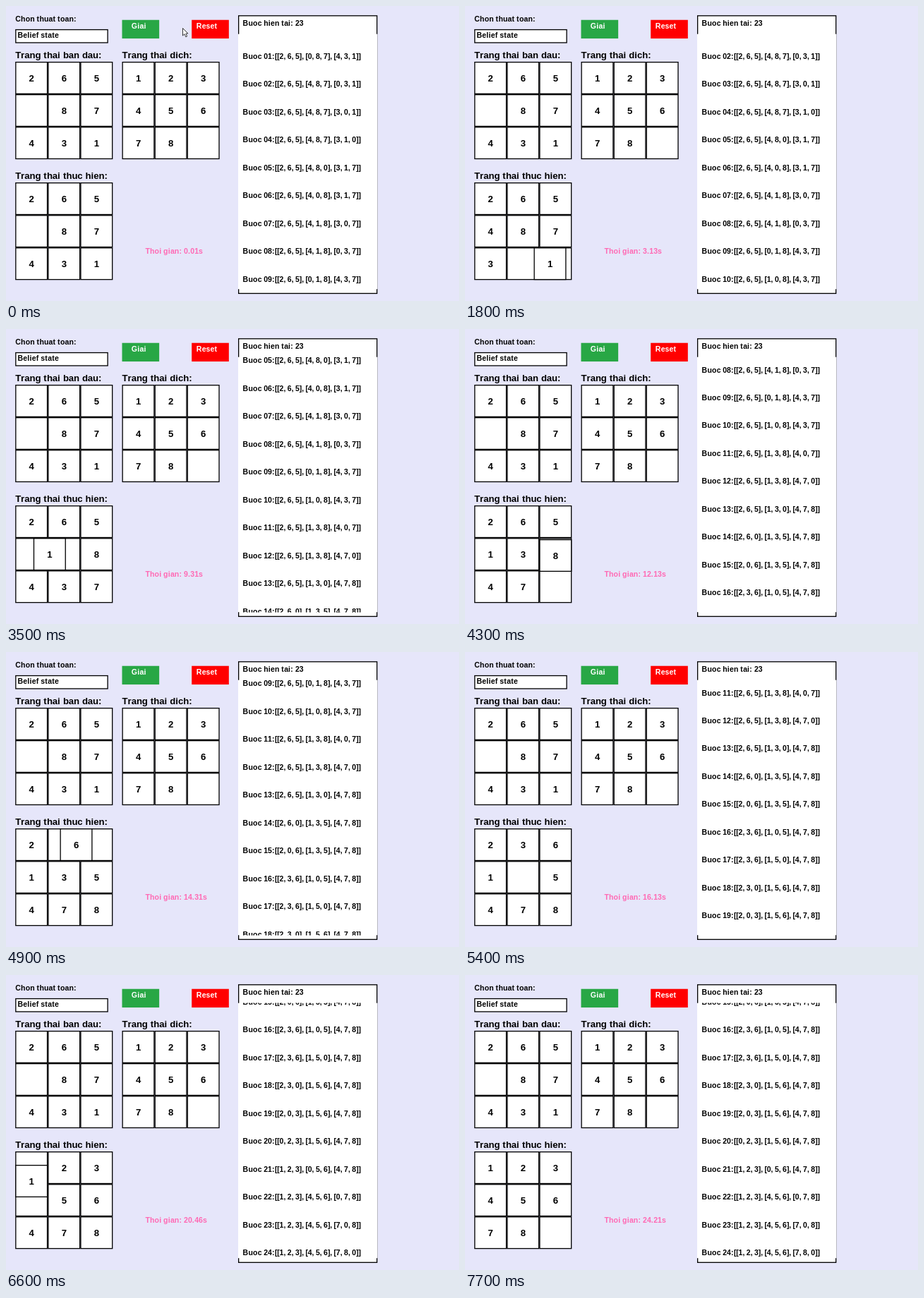
An HTML page with a canvas that plays this animation: 642 by 418 pixels, repeating every 7800 ms.

```html
<!DOCTYPE html>
<html lang="vi">
<head>
<meta charset="utf-8">
<title>8-puzzle</title>
<style>
  html, body { margin: 0; width: 100%; height: 100%; overflow: hidden; background: #e6e6fa; }
  canvas { display: block; }
</style>
</head>
<body>
<canvas id="stage" width="642" height="418"></canvas>
<script>
const ctx = document.getElementById('stage').getContext('2d');
const SCALE = 0.658;          // layout units to stage pixels
const LOOP = 7800, FRAME = 100;
const TILE = 70, LINE = 60;
const START = '265087431', GOAL = '123456780';

// Directions in which the blank travels
const MOVES = 'DRRULDLURDRUULDRULLDDRR';
const STEP = { U: -3, D: 3, L: -1, R: 1 };
const FIRST_MOVE = 1.031, MOVE_PERIOD = 1.0072, SLIDE = 0.5;

// Keyframes: [seconds, value]
const CLOCK = [[0.93, 0.01], [1.8, 3.13], [3.5, 9.31], [4.3, 12.13], [5.4, 16.13], [6, 18.3], [7.64, 24.21]];
const SCROLL = [[1.2, 0], [1.8, 3], [3.5, 14], [4.3, 22], [5.4, 31], [6, 38], [6.5, 45]];
const POINTER_X = [[0, 250], [0.7, 196], [0.95, 196], [1.7, 562]];
const POINTER_Y = [[0, 31], [0.7, 33], [0.95, 33], [1.7, 190]];

const states = [START];
for (const move of MOVES) {
  const cells = [...states[states.length - 1]];
  const blank = cells.indexOf('0'), next = blank + STEP[move];
  [cells[blank], cells[next]] = [cells[next], cells[blank]];
  states.push(cells.join(''));
}

const steps = states.map((state, i) => {
  const rows = state.match(/.../g).map(row => `[${[...row].join(', ')}]`);
  return `Buoc ${String(i + 1).padStart(2, '0')}:[${rows.join(', ')}]`;
});

const clamp = (v, lo, hi) => Math.min(hi, Math.max(lo, v));

function track(keys, t) {
  if (t <= keys[0][0]) return keys[0][1];
  for (let i = 1; i < keys.length; i++) {
    const [t0, a] = keys[i - 1], [t1, b] = keys[i];
    if (t <= t1) return a + (b - a) * (t - t0) / (t1 - t0);
  }
  return keys[keys.length - 1][1];
}

function fillBox(x, y, w, h, color) {
  ctx.fillStyle = color;
  ctx.fillRect(x, y, w, h);
}

function frameBox(x, y, w, h) {
  fillBox(x, y, w, h, '#000');
  fillBox(x + 2, y + 2, w - 4, h - 4, '#fff');
}

// Whole-unit advances give the uneven spacing of hinted type
function advance(ch) {
  return Math.round(ctx.measureText(ch).width + (/[a-z:.]/i.test(ch) ? 0.2 : 0));
}

function label(text, x, baseline, size = 16, color = '#000') {
  ctx.font = `bold ${size}px "Liberation Sans", Arial, sans-serif`;
  ctx.fillStyle = color;
  for (const ch of text) {
    ctx.fillText(ch, x, baseline);
    x += advance(ch);
  }
}

function tile(digit, x, y) {
  frameBox(x, y, TILE, TILE);
  if (digit !== '0') label(digit, x + 29.5, y + 42, 20);
}

function board(state, left, top, slide) {
  const place = i => [left + i % 3 * TILE, top + Math.floor(i / 3) * TILE];
  [...state].forEach((digit, i) => tile(slide && i === slide.from ? '0' : digit, ...place(i)));
  if (!slide) return;
  const [x0, y0] = place(slide.from), [x1, y1] = place(slide.to);
  tile(state[slide.from], x0 + (x1 - x0) * slide.progress, y0 + (y1 - y0) * slide.progress);
}

function runningBoard(clock) {
  const index = clamp(Math.floor((clock - FIRST_MOVE) / MOVE_PERIOD), 0, MOVES.length - 1);
  const progress = clamp((clock - FIRST_MOVE - index * MOVE_PERIOD) / SLIDE, 0, 1);
  if (progress === 0 || progress === 1) return board(states[index + progress], 20, 380);
  const blank = states[index].indexOf('0');
  board(states[index], 20, 380, { from: blank + STEP[MOVES[index]], to: blank, progress });
}

function stepPanel(t) {
  frameBox(500, 20, 300, 600);
  label('Buoc hien tai: 23', 510, 43);
  const offset = Math.min(steps.length * LINE - 550, 20 * Math.floor(track(SCROLL, t)));
  ctx.save();
  ctx.beginPath();
  ctx.rect(499, 60, 302, 550);
  ctx.clip();
  fillBox(500, 60, 300, 550, '#fff');
  steps.forEach((text, i) => label(text, 510, 113.5 + i * LINE - offset));
  ctx.restore();
}

function pointer(t) {
  if (t > 1.7) return;
  ctx.save();
  ctx.setTransform(1, 0, 0, 1, track(POINTER_X, t), track(POINTER_Y, t));
  const arrow = new Path2D('M.5 .5V11L3 8.7L4.8 12.8L6.6 12L4.9 8H8Z');
  ctx.fillStyle = '#fff';
  ctx.fill(arrow);
  ctx.strokeStyle = '#222';
  ctx.lineWidth = 0.9;
  ctx.stroke(arrow);
  ctx.restore();
}

function draw(t) {
  const clock = track(CLOCK, t);
  ctx.setTransform(SCALE, 0, 0, SCALE, 0, 0);
  fillBox(0, 0, 980, 640, '#e6e6fa');

  label('Chon thuat toan:', 20, 33);
  frameBox(20, 50, 200, 30);
  label('Belief state', 25, 68.5);

  fillBox(250, 30, 80, 40, '#28a745');
  label('Giai', 270, 48, 16, '#fff');
  fillBox(400, 30, 80, 40, '#f00');
  label('Reset', 410, 48, 16, '#fff');

  label('Trang thai ban dau:', 20, 112, 20);
  board(START, 20, 120);
  label('Trang thai dich:', 250, 112, 20);
  board(GOAL, 250, 120);
  label('Trang thai thuc hien:', 20, 372, 20);
  runningBoard(clock);

  label(`Thoi gian: ${clock.toFixed(2)}s`, 300, 533.5, 16, '#ff69b4');
  stepPanel(t);
  pointer(t);
}

const begin = performance.now();
function tick() {
  const elapsed = (performance.now() - begin) % LOOP;
  draw(Math.floor(elapsed / FRAME) * FRAME / 1000);
  requestAnimationFrame(tick);
}
tick();
</script>
</body>
</html>
```
